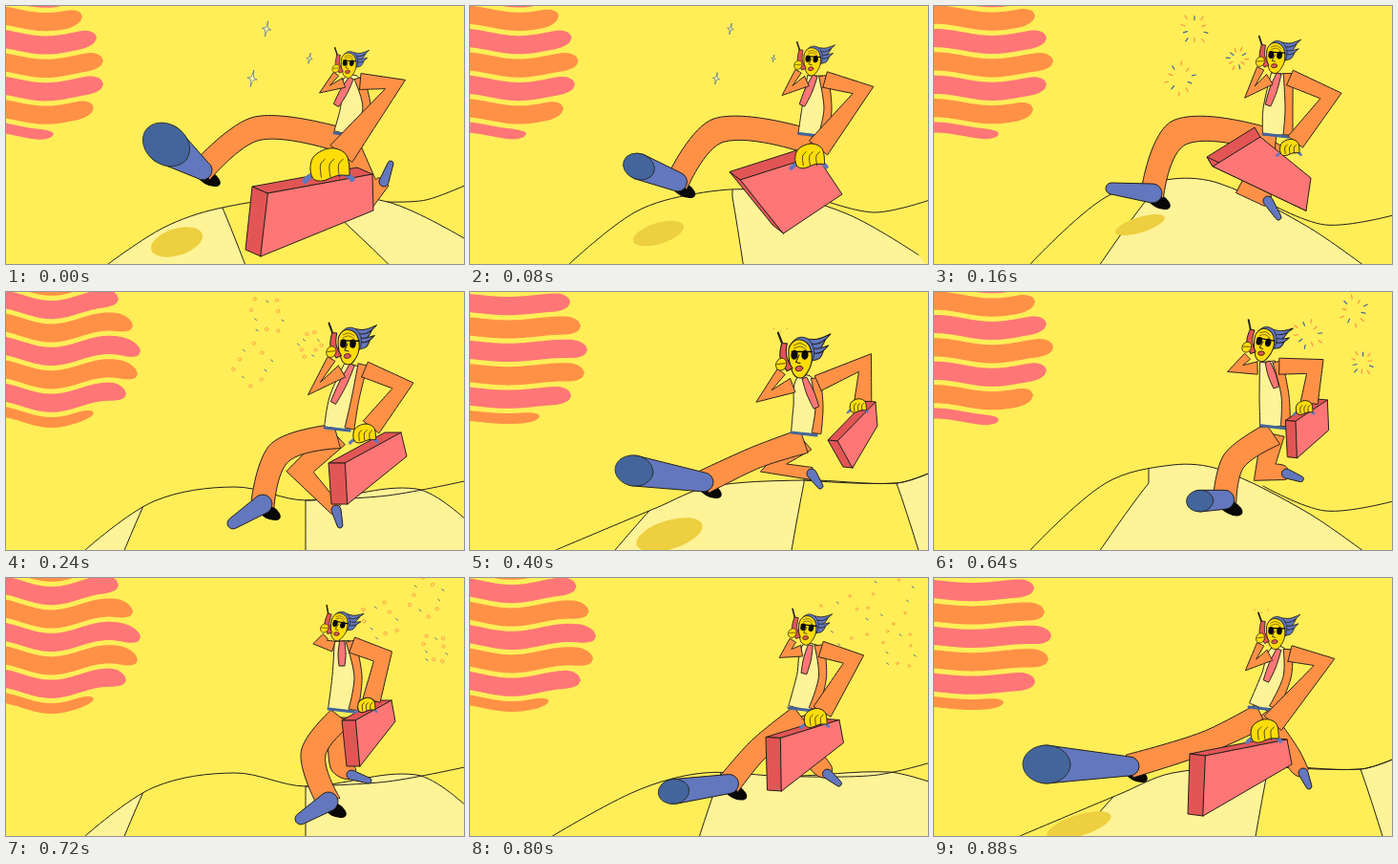
Recreate the animation shown at these times as an HTML page with a canvas. Size 480x270 px, loop 0.96 s.

```html
<!DOCTYPE html>
<html lang="en">
<head>
<meta charset="utf-8">
<title>Runner on the phone</title>
<style>
html, body { margin: 0; width: 100%; height: 100%; overflow: hidden; background: #ffee58; }
canvas { display: block; width: 480px; height: 270px; }
</style>
</head>
<body>
<canvas id="stage" width="480" height="270"></canvas>
<script>
const ctx = document.getElementById('stage').getContext('2d');
const INK = '#25201c', ORANGE = '#ff9146', PINK = '#ff7676', RED = '#e25555', BLUE = '#6277bd',
  NAVY = '#43659b', SKIN = '#ffdd0a', CREAM = '#fff398', SPOT = '#edcf3f', BLACK = '#080808';

// Landscape by step of a 6-step cycle. sun: amplitude, phase, stripe ends.
// seams: x of each panel edge on the hill; lean: x of the upright seam, slant.
const scenes = {
  0: { sun: [4, -.6, 80, 95, 102, 102, 92, 50], lean: [160, .52], seams: [-90, -60, 0, 222, 325, 700],
    hill: [107, 270, 165, 232, 222, 212, 310, 200, 400, 205, 485, 246], far: [400, 205, 440, 203, 485, 186] },
  2: { sun: [3.5, -1.6, 106, 118, 125, 118, 104, 68], lean: [340, .5], seams: [-90, -60, -90, -60, 225, 700],
    hill: [101, 270, 180, 200, 250, 181, 300, 186, 390, 230, 455, 275], far: [345, 203, 410, 229, 485, 218] },
  3: { sun: [6, -.9, 118, 133, 141, 138, 126, 92], lean: [314, .22], seams: [0, 155, 314, 700, 800, 900],
    hill: [83, 270, 155, 219, 240, 204, 314, 218, 430, 206, 485, 241], far: [314, 218, 400, 213, 485, 197] },
  5: { sun: [2, -.5, 105, 116, 123, 120, 106, 73], lean: [385, .42], seams: [-90, -60, 215, 350, 447, 700],
    hill: [90, 270, 195, 226, 250, 204, 350, 197, 447, 200, 485, 188], far: [350, 197, 447, 200, 485, 188] }
};

// Joints of the runner by step of the 12-step loop. head: x, y, size, tilt; fist: x, y, size;
// leg and back: knee, ankle; toe: x, y, radius; bag: four front corners, depth; spot: x, y, rx, ry.
const poses = {
  0: { head: [359, 61, .72, .05], fist: [340, 166, 1.9], belly: [364, 106], waist: [357, 134],
    leg: [264, 128, 206, 172], toe: [168, 145, 21], back: [386, 196, 396, 184], backToe: [403, 165],
    tie: [346, 104], phoneElbow: [334, 87], elbow: [408, 82],
    bag: [274, 196, 384, 176, 385, 214, 267, 262, -16, -7], spot: [179, 247, 28, 14] },
  2: { head: [358, 53, .88, .06], fist: [373, 148, .95], belly: [358, 108], waist: [358, 135],
    leg: [258, 132, 229, 196], toe: [186, 191, 6], back: [330, 192, 350, 204], backToe: [361, 221],
    tie: [350, 104], phoneElbow: [331, 90], elbow: [416, 94],
    bag: [292, 168, 342, 137, 395, 180, 390, 214, -6, -10], spot: [216, 229, 27, 8] },
  3: { head: [359, 56, 1, .02], fist: [376, 148, 1.1], belly: [352, 112], waist: [347, 143],
    leg: [287, 168, 269, 222], toe: [238, 242, 6], back: [308, 188, 346, 228], backToe: [350, 244],
    tie: [343, 116], phoneElbow: [323, 101], elbow: [416, 98],
    bag: [355, 179, 414, 147, 420, 172, 358, 222, -17, 0] },
  5: { head: [346, 68, 1.1, 0], fist: [407, 119, .8], belly: [352, 120], waist: [350, 148],
    leg: [300, 173, 245, 199], toe: [172, 187, 16], back: [318, 184, 358, 190], backToe: [367, 203],
    tie: [363, 121], phoneElbow: [308, 109], elbow: [414, 74],
    bag: [385, 156, 425, 115, 427, 140, 401, 184, -10, -1], spot: [209, 254, 36, 15] },
  6: { head: [339, 62, 1.24, .1], fist: [409, 97, .75], belly: [352, 120], waist: [364, 146],
    leg: [300, 161, 238, 184], toe: [218, 152, 22], back: [340, 178, 384, 158], backToe: [393, 163],
    tie: [372, 116], phoneElbow: [289, 106], elbow: [408, 70],
    bag: [404, 108, 429, 83, 425, 134, 400, 127, -3, -3], spot: [215, 250, 22, 17] },
  9: { head: [349, 50, .8, .2], fist: [378, 133, .85], belly: [355, 103], waist: [351, 138],
    leg: [322, 184, 338, 234], toe: [309, 252, 6], back: [350, 194, 362, 206], backToe: [380, 212],
    tie: [352, 92], phoneElbow: [329, 67], elbow: [395, 82],
    bag: [366, 149, 404, 128, 408, 150, 371, 197, -14, 0] },
  11: { head: [358, 57, .88, .02], fist: [347, 160, 1.35], belly: [356, 104], waist: [343, 136],
    leg: [285, 172, 205, 197], toe: [118, 195, 20], back: [374, 185, 387, 204], backToe: [393, 218],
    tie: [348, 108], phoneElbow: [332, 91], elbow: [409, 88],
    bag: [284, 186, 370, 169, 375, 195, 282, 249, -16, -2], spot: [152, 259, 35, 11] }
};

function sample(set, step, length) {
  if (set[step]) return set[step];
  const keys = Object.keys(set).map(Number);
  const from = Math.max(...keys.filter(k => k < step));
  const to = keys.find(k => k > step) ?? length;
  const a = set[from], b = set[to % length], t = (step - from) / (to - from), out = {};
  for (const part in a) if (b[part]) out[part] = a[part].map((v, i) => v + (b[part][i] - v) * t);
  return out;
}

// Smooth curve through the points; sharp turns stay corners.
function curve(flat, closed = true) {
  const n = flat.length / 2;
  const at = i => {
    const k = closed ? (i + n) % n : Math.max(0, Math.min(n - 1, i));
    return [flat[2 * k], flat[2 * k + 1]];
  };
  const tangent = i => {
    const [ax, ay] = at(i - 1), [bx, by] = at(i), [cx, cy] = at(i + 1);
    const product = Math.hypot(bx - ax, by - ay) * Math.hypot(cx - bx, cy - by);
    const turn = ((bx - ax) * (cx - bx) + (by - ay) * (cy - by)) / (product || 1);
    const span = Math.hypot(cx - ax, cy - ay) || 1;
    return turn < .15 ? [0, 0] : [(cx - ax) / span, (cy - ay) / span];
  };
  ctx.beginPath();
  ctx.moveTo(...at(0));
  for (let i = 0; i < (closed ? n : n - 1); i++) {
    const [ax, ay] = at(i), [bx, by] = at(i + 1), [tx, ty] = tangent(i), [ux, uy] = tangent(i + 1);
    const h = Math.hypot(bx - ax, by - ay) / 3;
    ctx.bezierCurveTo(ax + tx * h, ay + ty * h, bx - ux * h, by - uy * h, bx, by);
  }
}

function paint(fill, line = INK, width = 1) {
  if (fill) { ctx.fillStyle = fill; ctx.fill(); }
  if (line) { ctx.strokeStyle = line; ctx.lineWidth = width; ctx.stroke(); }
}

function blob(points, fill, line, width) {
  curve(points);
  paint(fill, line, width);
}

function stroke(points, color = INK, width = 1) {
  curve(points, false);
  paint(null, color, width);
}

function polygon(fill, ...points) {
  ctx.beginPath();
  points.forEach(p => ctx.lineTo(...p));
  ctx.closePath();
  paint(fill);
}

function oval(x, y, rx, ry, angle, fill, line = null) {
  ctx.beginPath();
  ctx.ellipse(x, y, rx, ry, angle, 0, 7);
  paint(fill, line, .8);
}

// Tapered tube through three joints with a width at each.
function limb([ax, ay], [bx, by], [cx, cy], [wa, wb, wc], fill = ORANGE) {
  const u = Math.atan2(by - ay, bx - ax), v = Math.atan2(cy - by, cx - bx);
  const bend = Math.atan2(Math.sin(v - u), Math.cos(v - u)) / 2;
  const side = (x, y, angle, w) => [x - Math.sin(angle) * w / 2, y + Math.cos(angle) * w / 2];
  const miter = wb / Math.max(.7, Math.cos(bend));
  blob([...side(ax, ay, u, wa), ...side(bx, by, u + bend, miter), ...side(cx, cy, v, wc),
    ...side(cx, cy, v, -wc), ...side(bx, by, u + bend, -miter), ...side(ax, ay, u, -wa)], fill);
}

// A large toe points at the viewer and shows its dark sole.
function shoe([tx, ty, r], [hx, hy], heel) {
  const a = Math.atan2(hy - ty, hx - tx);
  ctx.beginPath();
  ctx.arc(tx, ty, r, a + Math.PI / 2, a - Math.PI / 2);
  ctx.arc(hx, hy, heel, a - Math.PI / 2, a + Math.PI / 2);
  ctx.closePath();
  paint(BLUE);
  if (r > heel) oval(tx, ty, r * 1.25, r, a, NAVY, INK);
}

function drawSun([amp, phase, ...ends], flipped) {
  for (let i = -1; i < 6; i++) {
    const end = ends[i] ?? ends[0] * .85, half = i === 5 ? 5.5 : 9.6, y = 3 + 24.4 * i + half;
    const edge = (x, side) => {
      const tip = Math.max(0, (x - end + 18) / 18);
      return y + amp * Math.sin(x * .052 + phase) + side * half * Math.sqrt(1 - tip * tip);
    };
    ctx.beginPath();
    for (let x = -4; x < end; x += 2) ctx.lineTo(x, edge(x, -1));
    for (let x = end; x > -4; x -= 2) ctx.lineTo(x, edge(x, 1));
    paint((i + 6) % 2 === +flipped ? ORANGE : PINK, null);
  }
}

function drawScene({ sun, hill, far, seams, lean: [upright, slant] }, step) {
  ctx.fillStyle = '#ffee58';
  ctx.fillRect(0, 0, 480, 270);
  drawSun(sun, step >= 3);
  ctx.save();
  curve(hill, false);
  ctx.lineTo(485, 280);
  ctx.lineTo(hill[0], 280);
  ctx.clip();
  const foot = x => x + (x - upright) * slant;
  for (let i = 0; i < 6; i += 2) {
    const [a, b] = seams.slice(i, i + 2);
    ctx.beginPath();
    ctx.moveTo(a, 170);
    ctx.lineTo(a, 200);
    ctx.quadraticCurveTo(a + (foot(a) - a) * .35, 225, foot(a), 280);
    ctx.lineTo(foot(b), 280);
    ctx.quadraticCurveTo(b + (foot(b) - b) * .35, 225, b, 200);
    ctx.lineTo(b, 170);
    paint(CREAM);
  }
  ctx.restore();
  stroke(hill);
  stroke(far);
}

function drawSparkles(step, [hx, hy, size]) {
  const stage = step % 6;
  const centres = step < 6 ? [[273, 24, 6], [258, 76, 6.5], [318, 55, 4]]
    : [[440, 20, 6], [392, 44, 6], [449, 74, 4.5]];
  if (stage === 5) {
    for (let i = 0; i < 3; i++)
      oval(hx - 25 * size + i * 7, hy - 27 * size + i % 2 * 3, .8, .8, 0, ORANGE);
    return;
  }
  for (const [x, y, r] of centres) {
    if (stage < 2) {
      const points = [];
      for (let i = 0; i < 8; i++) {
        const a = i * Math.PI / 4 + .2, d = (i % 2 ? .32 : i % 4 ? .8 : 1.35) * r * (1 - stage * .3);
        points.push(x + d * Math.sin(a), y - d * Math.cos(a));
      }
      blob(points, '#fff7b0', NAVY, .7);
      continue;
    }
    for (let i = 0; i < 10; i++) {
      const a = i * .628 + x, d = r * (stage === 2 ? 1.7 : stage - .3) * (.8 + i * 7 % 5 * .12);
      const px = x + d * Math.cos(a), py = y + d * Math.sin(a), color = i % 3 ? ORANGE : NAVY;
      if (stage === 2) stroke([px, py, px + 4 * Math.cos(a), py + 4 * Math.sin(a)], color, 1.2);
      else if (i % 3) oval(px, py, 5 / stage, 5 / stage, 0, null, color);
      else stroke([px, py, px + 2, py + 1.5], color);
    }
  }
}

function drawHead([x, y, size, tilt]) {
  ctx.save();
  ctx.translate(x, y);
  ctx.rotate(tilt);
  ctx.scale(size, size);
  for (let i = 0; i < 4; i++) {
    const top = -17 + i * 4.5, tip = 29 - i % 2 * 4 - i;
    blob([3, top - 1, 16, top, tip, top - 5 + i, 18, top + 5, 5, top + 8], BLUE);
  }
  oval(1.5, -4, 12, 15, 0, BLUE, INK);
  blob([-11, -6, -6, -15, 2, -16, 9, -10, 11, 4, 6, 16, 0, 20, -7, 15], SKIN);
  for (const dy of [0, 3]) stroke([-6, -11 + dy, 0, -13 + dy, 6, -10 + dy], INK, .6);
  for (const gx of [-5.5, 4.5]) oval(gx, -2, 3.3, 4.6, .1, BLACK);
  stroke([-8, -5, 11, -5], BLACK, 1.4);
  stroke([-1, -2, -4, 5, 0, 6]);
  oval(-1, 11, 3.6, 2.4, -.2, RED, INK);
  stroke([-16, -10, -21, -23], INK, 2);
  limb([-15, -13], [-16, 0], [-10, 12], [5, 6, 6], RED);
  oval(-18, 7, 5, 6, .4, SKIN, INK);
  stroke([-22, 7, -14, 6], INK, .7);
  ctx.restore();
}

function drawBag([ax, ay, bx, by, cx, cy, ex, ey, dx, dy]) {
  const a = [ax, ay], b = [bx, by], e = [ex, ey], shift = (x, y) => [x + dx, y + dy];
  polygon(RED, a, shift(ax, ay), shift(bx, by), b);
  polygon(RED, a, shift(ax, ay), shift(ex, ey), e);
  polygon(PINK, a, b, [cx, cy], e);
}

function drawFist([x, y, size]) {
  ctx.save();
  ctx.translate(x, y);
  ctx.scale(size, size);
  stroke([-14, 9, -10, 6, 8, 5, 12, 8], BLUE, 3);
  blob([-10, 7, -10.5, -2, -6, -7, 2, -9, 9, -5, 10.5, 6, 4, 6, -5, 9], SKIN, INK, 1 / size);
  for (const fx of [-5, 0, 5]) stroke([fx, 7, fx - .5, 0, fx + 2, -3], INK, .8 / size);
  ctx.restore();
}

function drawRunner({ head, fist, belly, waist, leg, toe, back, backToe, tie, phoneElbow, elbow, bag }) {
  const [hx, hy, size] = head, [fx, fy, grip] = fist;
  const fromHead = (x, y) => [hx + x * size, hy + y * size];
  const right = ([x, y], d) => [x + d, y];
  const hip = [waist[0], waist[1] + 8], ankle = leg.slice(2), heel = back.slice(2);
  const neck = fromHead(4, 20);

  limb(hip, back.slice(0, 2), heel, [24, 20, 13]);
  shoe([...backToe, 3], heel, 5);
  oval(ankle[0] + 6, ankle[1] + 8, 14, 7, .5, BLACK);
  limb(hip, leg.slice(0, 2), ankle, [26, 23, 25]);
  shoe(toe, ankle, 10);
  limb(neck, belly, waist, [16, 26, 27], CREAM);
  limb(fromHead(15, 20), right(belly, 14), right(waist, 13), [10, 8, 10]);
  stroke([waist[0] - 13, waist[1] - 1, waist[0] + 13, waist[1] + 2], NAVY, 3);
  limb(neck, [(neck[0] + tie[0]) / 2, (neck[1] + tie[1]) / 2], tie, [5, 8, 6], PINK);
  limb(fromHead(-7, 27), phoneElbow, fromHead(-18, 14), [14, 13, 9].map(w => w * size));
  drawHead(head);
  drawBag(bag);
  limb(fromHead(17, 25), elbow, [fx + 6 * grip, fy - 6 * grip], [17, 16, 10 + 10 * grip]);
  drawFist(fist);
}

function render(now) {
  const step = Math.floor(now / 80) % 12;
  const pose = sample(poses, step, 12);
  ctx.lineJoin = ctx.lineCap = 'round';
  drawScene(sample(scenes, step % 6, 6), step % 6);
  if (pose.spot) oval(...pose.spot, -.3, SPOT);
  drawSparkles(step, pose.head);
  drawRunner(pose);
  requestAnimationFrame(render);
}
render(0);
</script>
</body>
</html>
```
